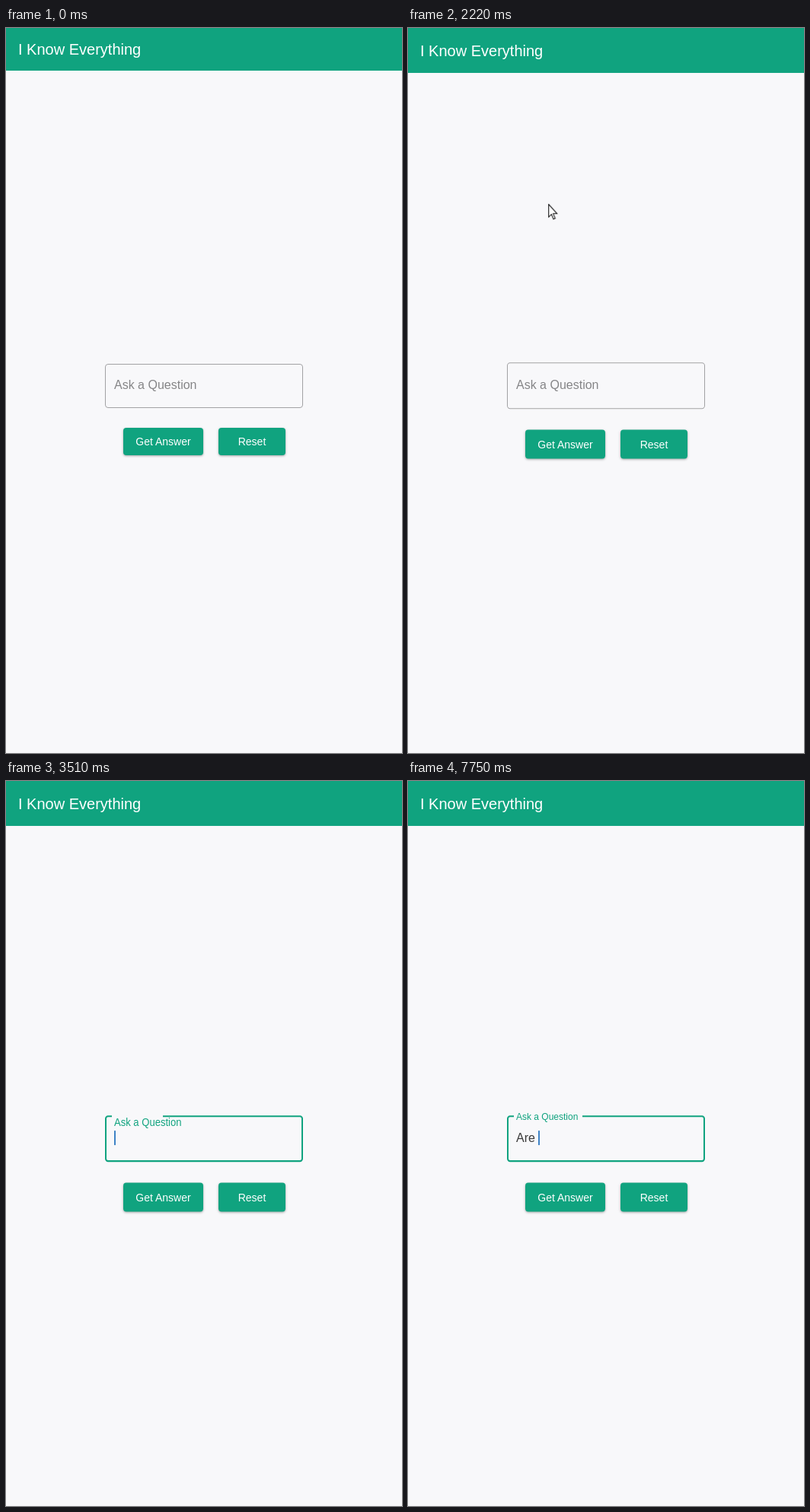
An HTML page that plays this animation: 520 px wide and 952 px high, repeating every 8000 ms.

```html
<!DOCTYPE html>
<html lang="en">
<head>
<meta charset="utf-8">
<title>I Know Everything</title>
<style>
:root {
  --paper: #f8f8fa;
  --green: #10a37f;
  --loop: 8s infinite;
}
html, body {
  margin: 0;
  width: 100%;
  height: 100%;
  overflow: hidden;
  background: var(--paper);
}
.page {
  position: absolute;
  top: 0;
  left: 0;
  width: 520px;
  height: 952px;
  transform-origin: 0 0;
  font: 16px "Liberation Sans", Arial, sans-serif;
  white-space: nowrap;
  animation: relayout step-end var(--loop);
}
.page * { position: absolute; box-sizing: border-box; }

header {
  top: 0;
  left: 0;
  width: 520px;
  height: 56px;
  padding-left: 16px;
  background: var(--green);
  color: #fff;
  font-size: 20px;
  line-height: 56px;
}
.field {
  left: 130px;
  top: calc(50% - 35px);
  width: 260px;
  height: 58px;
  line-height: 56px;
}
.outline {
  inset: 0;
  border: 1px solid #a2a2a4;
  border-radius: 4px;
  animation: focus step-end var(--loop);
}
.notch {
  left: 9px;
  top: -1px;
  width: 0;
  height: 4px;
  background: var(--paper);
  animation: notch var(--loop);
}
.label {
  left: 12px;
  top: 0;
  color: #858587;
  transform-origin: 0 50%;
  animation: float var(--loop), tint step-end var(--loop);
}
.typed { left: 12px; top: 0; color: #3a3a3a; }
.typed span { position: static; visibility: hidden; }
.typed span:nth-child(1) { animation: key1 step-end var(--loop); }
.typed span:nth-child(2) { animation: key2 step-end var(--loop); }
.typed span:nth-child(3) { animation: key3 step-end var(--loop); }
.caret {
  left: 12px;
  top: 19px;
  width: 2px;
  height: 18px;
  background: #3f83c6;
  opacity: 0;
  animation: caret step-end var(--loop);
}
.button {
  top: calc(50% + 49px);
  height: 36px;
  border-radius: 4px;
  background: var(--green);
  box-shadow: 0 1px 3px rgba(0, 0, 0, .35);
  color: #fff;
  font-size: 14px;
  line-height: 36px;
  text-align: center;
}
.cursor {
  left: 0;
  top: 0;
  width: 13px;
  height: 20px;
  opacity: 0;
  animation: travel linear var(--loop), presence step-end var(--loop);
}

/* The viewport shrinks to 904px and is stretched back to the full height. */
@keyframes relayout {
  0% { height: 952px; transform: none; }
  1.25%, 100% { height: 904px; transform: scaleY(calc(952 / 904)); }
}
@keyframes focus {
  43%, 100% { border: 2px solid var(--green); }
}
@keyframes notch {
  0%, 43% { width: 0; animation-timing-function: cubic-bezier(.4, 0, .2, 1); }
  44.875%, 100% { width: 90px; }
}
@keyframes float {
  0%, 43% { transform: none; animation-timing-function: cubic-bezier(.4, 0, .2, 1); }
  44.875%, 100% { transform: translateY(-26.2px) scale(.75); }
}
@keyframes tint {
  43%, 100% { color: var(--green); }
}
@keyframes key1 { 91.5%, 100% { visibility: visible; } }
@keyframes key2 { 94.125%, 100% { visibility: visible; } }
@keyframes key3 { 95.5%, 100% { visibility: visible; } }
@keyframes caret {
  0%, 48.25%, 60.75%, 73.25%, 85.875% { left: 12px; opacity: 0; }
  43%, 54.5%, 67%, 79.5% { left: 12px; opacity: 1; }
  91.5% { left: 22.7px; opacity: 1; }
  94.125% { left: 28px; opacity: 1; }
  95.5% { left: 36.9px; opacity: 1; }
  96.875%, 100% { left: 41.3px; opacity: 1; }
}
/* Leaves the field to the right, returns across it, climbs, then comes back to click. */
@keyframes travel {
  0%, 12.8% { transform: translate(406px, 480px); }
  19.6% { transform: translate(515px, 493px); }
  21.875% { transform: translate(508px, 527px); }
  23.6% { transform: translate(290px, 465px); animation-timing-function: ease-out; }
  31.75%, 32.1% { transform: translate(138px, 112px); }
  33.6%, 34.6% { transform: translate(162px, 210px); animation-timing-function: ease-in-out; }
  41.75%, 100% { transform: translate(255px, 446px); }
}
/* The arrow is not drawn while it is over the field. */
@keyframes presence {
  0%, 19.625%, 23.5%, 39.75%, 100% { opacity: 0; }
  11.75%, 21.875%, 24.25% { opacity: 1; }
  33.6% { opacity: .7; }
  34.6% { opacity: 1; }
}
</style>
</head>
<body>
<main class="page">
  <header>I Know Everything</header>
  <div class="field">
    <div class="outline"></div>
    <div class="notch"></div>
    <div class="label">Ask a Question</div>
    <div class="typed"><span>A</span><span>r</span><span>e</span></div>
    <div class="caret"></div>
  </div>
  <div class="button" style="left:154px;width:105px">Get Answer</div>
  <div class="button" style="left:279px;width:88px">Reset</div>
  <svg class="cursor" viewBox="0 0 13 20">
    <path d="M.5 .5v16l3.7-3.5 2.6 6 2.3-1-2.6-5.8h5z" fill="#fff" stroke="#111"/>
  </svg>
</main>
</body>
</html>
```
